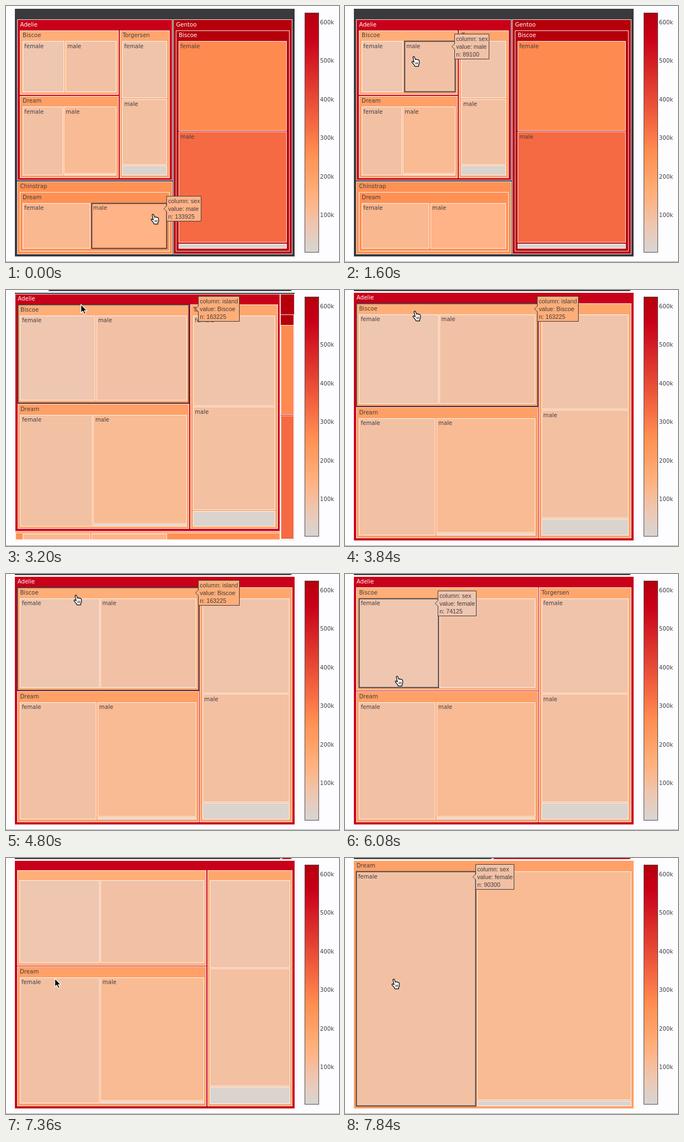
Animation of 600 by 461 pixels, one loop 8 s. Source, as an HTML page with a canvas:

```html
<!DOCTYPE html>
<html lang="en">
<head>
<meta charset="utf-8">
<title>Penguin treemap</title>
<style>
  html, body { margin: 0; width: 100%; height: 100%; overflow: hidden; background: #fdfcff; }
  canvas { display: block; width: 600px; height: 461px; }
</style>
</head>
<body>
<canvas></canvas>
<script>
const LOOP = 8000, TICK = 160, ZOOM = 500;
const STAGE = [16, 5, 520, 451];
const HEADER = 19.5, PAD = 4.7, GAP = 2.5;
const INK = '#403d42', DARK = '#3b393c';
const LABEL_FONT = '10.15px "DejaVu Sans", sans-serif';
const TIP_FONT = '10.75px "Liberation Sans", Arial, sans-serif';

const canvas = document.querySelector('canvas');
const ctx = canvas.getContext('2d');
const dpr = window.devicePixelRatio || 1;
canvas.width = 600 * dpr;
canvas.height = 461 * dpr;
ctx.scale(dpr, dpr);

const lerp = (a, b, p) => a + (b - a) * p;
const ease = p => p < 0.5 ? 4 * p ** 3 : 1 - 4 * (1 - p) ** 3;
const crisp = v => Math.floor(v) + 0.5;

// Colour scale: value in thousands, colour
const SCALE = [
  [0, 0xd6d6d6], [75, 0xefc6af], [90, 0xf2c1a4], [113, 0xf8bb94],
  [134, 0xffb387], [163, 0xffae78], [206, 0xffa066], [254, 0xff9154],
  [271, 0xff8a50], [334, 0xf56a42], [559, 0xc80019], [625, 0xb5000c]
];
function colorOf(n) {
  const k = n / 1000;
  let i = 1;
  while (i < SCALE.length - 1 && SCALE[i][0] < k) i++;
  const [a, from] = SCALE[i - 1], [b, to] = SCALE[i];
  const p = Math.min(1, (k - a) / (b - a));
  const mix = [16, 8, 0].map(s => Math.round(lerp(from >> s & 255, to >> s & 255, p)));
  return `rgb(${mix})`;
}

// Tree: groups only divide space, nodes are drawn
const sum = kids => kids.reduce((s, k) => s + k.n, 0);
const leaf = (label, n) => ({ label, n, column: 'sex' });
const node = (column, label, axis, ...kids) => ({ column, label, axis, kids, n: sum(kids) });
const group = (axis, ...kids) => ({ group: true, axis, kids, n: sum(kids) });

const adelieDream = node('island', 'Dream', 'x',
  leaf('female', 90300), group('y', leaf('male', 113275), leaf('', 2975)));
const adelie = node('species', 'Adelie', 'x',
  group('y',
    node('island', 'Biscoe', 'x', leaf('female', 74125), leaf('male', 89100)),
    adelieDream),
  node('island', 'Torgersen', 'y', leaf('female', 81500), leaf('male', 92800), leaf('', 14725)));
const chinstrap = node('species', 'Chinstrap', 'x',
  node('island', 'Dream', 'x', leaf('female', 119925), leaf('male', 133925)));
const gentoo = node('species', 'Gentoo', 'x',
  node('island', 'Biscoe', 'y', leaf('female', 271425), leaf('male', 334575), leaf('', 18350)));
const root = node('', '', 'x', group('y', adelie, chinstrap), gentoo);

const fillOf = item => item === root ? DARK : colorOf(item.n);
const textOf = item => item.n > 400000 ? '#fff' : INK;
const inset = ([x0, y0, x1, y1], d) => [x0 + d, y0 + d, x1 - d, y1 - d];

// Each node gives up half a gap on every side, its children's cells win it back
function place(item, cell, out) {
  let [x0, y0, x1, y1] = cell;
  if (!item.group) {
    const rect = inset(cell, GAP / 2);
    out.set(item, rect);
    [x0, y0, x1, y1] = inset(rect, PAD - GAP / 2);
    y0 += HEADER - PAD;
  }
  let used = 0;
  for (const kid of item.kids || []) {
    const a = used / item.n, b = (used += kid.n) / item.n;
    place(kid, item.axis === 'x'
      ? [lerp(x0, x1, a), y0, lerp(x0, x1, b), y1]
      : [x0, lerp(y0, y1, a), x1, lerp(y0, y1, b)], out);
  }
  return out;
}

const VIEWS = [[-ZOOM, root], [2855, adelie], [7225, adelieDream]]
  .map(([start, top]) => ({ start, top, rects: place(top, inset(STAGE, -GAP / 2), new Map()) }));

// Edges at or beyond the zoomed box are pushed to the stage border
function exitRect(rect, ref) {
  return rect.map((v, i) => {
    const lo = i % 2, hi = lo + 2;
    return v <= ref[lo] + 8 ? STAGE[lo] : v >= ref[hi] - 8 ? STAGE[hi] : v;
  });
}

const POINTER = [
  [0, 265, 375], [160, 265, 375], [640, 252, 250], [960, 235, 52], [1280, 150, 85],
  [1440, 124, 91], [1700, 124, 91], [2100, 130, 34], [2240, 135, 26], [3300, 135, 26],
  [3520, 126, 38], [5200, 126, 38], [5700, 94, 184], [6200, 94, 184], [6720, 88, 217],
  [7500, 88, 217], [7725, 88, 218], [LOOP, 88, 218]
];
function pointerAt(t) {
  const i = POINTER.findIndex(k => k[0] > t);
  const [ta, xa, ya] = POINTER[i - 1], [tb, xb, yb] = POINTER[i];
  const p = (t - ta) / (tb - ta);
  return [lerp(xa, xb, p), lerp(ya, yb, p)];
}

function hit(rects, [x, y]) {
  let found = null;
  for (const [item, [x0, y0, x1, y1]] of rects)
    if (x >= x0 && x <= x1 && y >= y0 && y <= y1) found = item;
  return found === root ? null : found;
}

function strokeRect(rect, color, width) {
  const [x0, y0, x1, y1] = rect.map(crisp);
  ctx.strokeStyle = color;
  ctx.lineWidth = width;
  ctx.strokeRect(x0, y0, x1 - x0, y1 - y0);
}

function drawLabel(item, [x0, y0]) {
  ctx.font = LABEL_FONT;
  ctx.fillStyle = textOf(item);
  ctx.fillText(item.label, x0 + (item.kids ? PAD : 3), y0 + 12);
}

function drawTip(item, rect) {
  const lines = [`column: ${item.column}`, `value: ${item.label}`, `n: ${item.n}`];
  ctx.font = TIP_FONT;
  const w = Math.round(Math.max(...lines.map(s => ctx.measureText(s).width)) + 5);
  const x = crisp(rect[2] - 0.5), y = Math.round(rect[1] + 9.3);
  ctx.beginPath();
  [[0, -22.5], [w, -22.5], [w, 22.5], [0, 22.5], [0, 5], [-5, 0], [0, -5]]
    .forEach(([dx, dy]) => ctx.lineTo(x + dx, y + dy));
  ctx.closePath();
  ctx.fillStyle = fillOf(item);
  ctx.fill();
  ctx.strokeStyle = textOf(item);
  ctx.lineWidth = 1;
  ctx.stroke();
  ctx.fillStyle = textOf(item);
  lines.forEach((s, i) => ctx.fillText(s, x + 2.7, y - 9.7 + 13.8 * i));
}

function drawPathbar(depth, p) {
  const startOf = (k, d) => k < d ? lerp(16, 515.5, k / d) : 515.5;
  const start = k => lerp(startOf(k, depth - 1), startOf(k, depth), p);
  [root, adelie].slice(0, depth).forEach((item, k) => {
    const a = start(k), b = start(k + 1);
    const slant = a > 16.5 ? 3 : 0;
    ctx.beginPath();
    ctx.moveTo(a + slant, 0);
    ctx.lineTo(b, 0);
    ctx.lineTo(b - 3, 2);
    ctx.lineTo(a, 2);
    ctx.fillStyle = fillOf(item);
    ctx.fill();
  });
}

function drawColorbar() {
  const min = 2975, max = gentoo.n, top = 12, bottom = 443.5;
  const g = ctx.createLinearGradient(0, bottom, 0, top);
  for (let i = 0; i <= 40; i++) g.addColorStop(i / 40, colorOf(lerp(min, max, i / 40)));
  ctx.fillStyle = g;
  ctx.fillRect(538.5, top, 24.5, bottom - top);
  strokeRect([538, top, 563, bottom], '#55504f', 1);
  ctx.font = LABEL_FONT;
  ctx.fillStyle = INK;
  for (let k = 100; k <= 600; k += 100)
    ctx.fillText(`${k}k`, 565.8, lerp(bottom, top, (k * 1000 - min) / (max - min)) + 4);
}

const ARROW = new Path2D('M0 0V15.2L3.5 12L6 17.6L8.6 16.5L6.1 11.1H10.8Z');
const HAND = new Path2D('M-1.6 1.2Q-1 -.6 .8 .3L2.9 5.6Q4 4.3 5.3 5.6Q6.7 4.7 7.7 6.2' +
  'Q9.6 5.7 9.8 8L10 12Q9.8 14 8.6 15.2L8.5 17.6H1.8L1.2 15.6L-3.2 10.6Q-4 8.6 -2 8.6L.4 10.2Z');
const KNUCKLES = new Path2D('M3.2 10.5L3.6 14M5.2 10.3L5.5 14M7.2 10.2L7.4 13.8');

function drawPointer([x, y], isHand) {
  ctx.save();
  ctx.translate(x, y);
  ctx.lineJoin = 'round';
  ctx.lineWidth = 1.2;
  ctx.fillStyle = isHand ? '#fff' : '#000';
  ctx.strokeStyle = isHand ? '#000' : '#fff';
  const shape = isHand ? HAND : ARROW;
  ctx.fill(shape);
  ctx.stroke(shape);
  if (isHand) {
    ctx.lineWidth = 0.8;
    ctx.stroke(KNUCKLES);
  }
  ctx.restore();
}

function draw(t) {
  const depth = VIEWS.findLastIndex(v => t >= v.start);
  const view = VIEWS[depth], last = VIEWS[depth - 1];
  const raw = Math.min(1, (t - view.start) / ZOOM);
  const zooming = raw < 1;
  const p = ease(raw);
  const pointer = pointerAt(t);

  let rects = view.rects;
  if (zooming) {
    const ref = last.rects.get(view.top);
    rects = new Map();
    for (const [item, from] of last.rects) {
      const to = view.rects.get(item) || exitRect(from, ref);
      rects.set(item, from.map((v, i) => lerp(v, to[i], p)));
    }
  }

  ctx.fillStyle = '#fdfcff';
  ctx.fillRect(0, 0, 600, 461);
  ctx.fillStyle = '#a9a8ab';
  ctx.fillRect(0, 460, 600, 1);
  if (depth) drawPathbar(depth, p);
  drawColorbar();

  const base = zooming ? last.top : view.top;
  for (const [item, rect] of rects) {
    const [x0, y0, x1, y1] = item === base ? rect : rect.map(crisp);
    ctx.fillStyle = fillOf(item);
    ctx.fillRect(x0, y0, x1 - x0, y1 - y0);
    if (item !== base) strokeRect(rect, 'rgba(255, 255, 255, 0.88)', 1);
  }

  const hovered = !zooming || raw > 0.6 ? hit(view.rects, pointer) : null;
  if (hovered) strokeRect(rects.get(hovered), INK, 1.8);
  for (const [item, rect] of rects)
    if (view.rects.has(item)) drawLabel(item, rect);
  if (hovered) drawTip(hovered, view.rects.get(hovered));
  drawPointer(pointer, hovered && !zooming);
}

const began = performance.now();
function frame() {
  const t = Math.max(0, performance.now() - began) % LOOP;
  draw(Math.floor(t / TICK) * TICK);
  requestAnimationFrame(frame);
}
frame();
</script>
</body>
</html>
```
